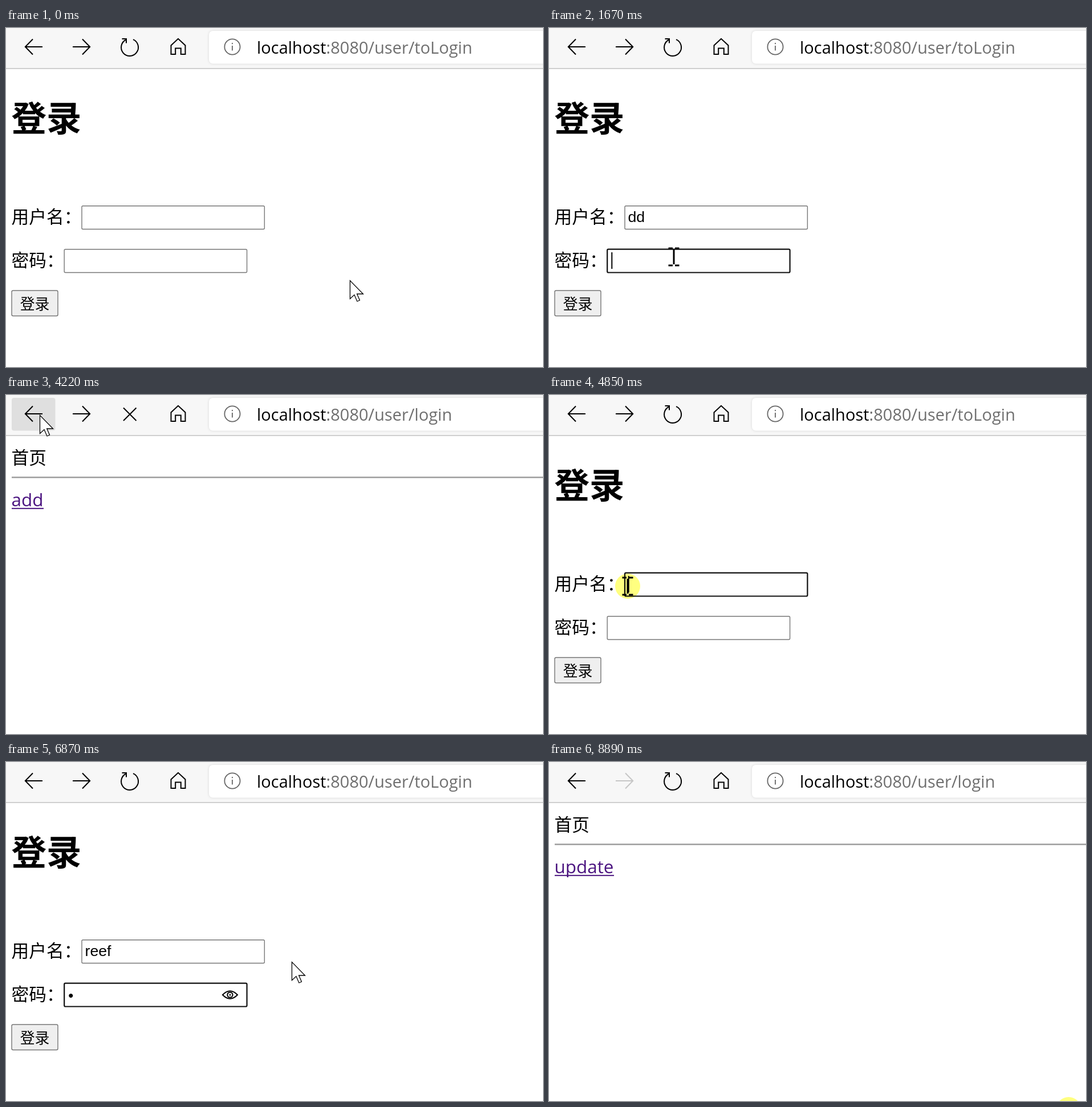
Recreate the animation shown at these times as an HTML page. Size 942 by 594 pixels, loop 8980 ms.

```html
<!DOCTYPE html>
<html lang="zh-CN">
<head>
<meta charset="utf-8">
<title>登录</title>
<style>
html, body { margin: 0; width: 100%; height: 100%; overflow: hidden; background: #fff; }
svg { display: block; width: 942px; height: 594px; }
text { white-space: pre; }
.cjk { font: 30.7px "Noto Sans CJK SC", "Noto Sans CJK", sans-serif; }
.head { font-size: 61.4px; font-weight: 700; }
.small { font-size: 25.8px; }
.ui { font: 29px "Open Sans", "Noto Sans", sans-serif; }
.val { font: 26.7px "Liberation Sans", Arial, sans-serif; }
.dots { font-size: 25.8px; }
.link { font-size: 31.4px; fill: #4b1480; }
.icon { fill: none; stroke: #000; stroke-width: 2; }
.field { fill: #fff; stroke: #767676; stroke-width: 1.4; }
.field.on { stroke: #101010; stroke-width: 2.2; }
.menu { fill: #fff; filter: drop-shadow(0 1px 3px rgba(0, 0, 0, .3)); }
#click { fill: #ffff80; mix-blend-mode: multiply; }
</style>
</head>
<body>
<svg viewBox="0 0 942 594">
  <rect width="942" height="594" fill="#fff"/>

  <g id="login">
    <text class="cjk head" x="9.6" y="181">登录</text>
    <text class="cjk" x="9.6" y="341.5">用户名：</text>
    <text class="cjk" x="9.6" y="417.5">密码：</text>
    <rect id="userBox" class="field" x="133" y="311.7" width="320.4" height="40.8" rx="2"/>
    <rect id="passBox" class="field" x="102.2" y="387.7" width="320.4" height="40.8" rx="2"/>
    <text id="user" class="val" x="138.5" y="340"></text>
    <text id="pass" class="val dots" x="109.3" y="417.5"></text>
    <g id="eye" class="icon">
      <path d="M380 408Q393 394.500 406 408Q393 421.500 380 408Z"/>
      <circle cx="393" cy="408" r="4.600"/>
      <circle cx="393" cy="408" r="1.500" fill="#000" stroke="none"/>
    </g>
    <rect id="button" x="10" y="460" width="81" height="44.500" rx="2.500" fill="#efefef" stroke="#767676" stroke-width="1.400"/>
    <text class="cjk small" x="24.800" y="493">登录</text>
    <rect id="caret" width="2" height="29"/>
    <g id="menu"></g>
  </g>

  <g id="home">
    <text class="cjk" x="9.600" y="121">首页</text>
    <path d="M10 144.300H942" stroke="#8c8c8c" stroke-width="2"/>
    <path d="M10 146H942" stroke="#dedede"/>
    <text id="link" class="ui link" x="9.600" y="195"></text>
    <rect id="line" x="10" y="197.800" height="2" fill="#4b1480"/>
  </g>

  <rect width="942" height="71" fill="#f7f7f7"/>
  <rect y="70" width="942" height="2" fill="#cfcfcf"/>
  <rect x="356" y="5" width="600" height="57.500" rx="7" fill="#fff" style="filter:drop-shadow(0 0 2px rgba(0,0,0,.13))"/>
  <rect id="hover" x="10" y="5" width="76.500" height="57.500" rx="4" fill="#dfdfdf"/>
  <g class="icon">
    <path d="M64 33H34M47 19.500L33.800 33L47 46.500"/>
    <path id="next" d="M117 33H147M134 19.500L147.200 33L134 46.500"/>
    <g id="reload">
      <path d="M223 20.200A15 15 0 1 1 210.500 20.500"/>
      <path d="M203.500 19H211V26.500"/>
    </g>
    <path id="stop" d="M206 22.500L228.500 45M228.500 22.500L206 45"/>
    <path d="M289.500 30.500L302 18.800L314.500 30.500V46H306.800V35.500H297.200V46H289.500Z"/>
  </g>
  <g fill="none" stroke="#666" stroke-width="1.800">
    <circle cx="397" cy="33" r="13.600"/>
    <path d="M397 31V39.500M397 26V28.300"/>
  </g>
  <text class="ui" x="440" y="45">localhost<tspan id="path" fill="#6f6f6f"></tspan></text>

  <circle id="click" r="22"/>
  <path id="arrow" d="M.5 .5V32.500L8 25.500L13 37L17.500 35L12.700 24H23.500Z" fill="#fff" stroke="#000" stroke-width="1.300"/>
  <path id="beam" d="M-9.500-15H-2M2-15H9.500M-9.500 15H-2M2 15H9.500M0-13V13" fill="none" stroke="#000" stroke-width="3"/>
</svg>
<script>
const LOOP = 8980;
const $ = id => document.getElementById(id);

// Each track holds [time, value] steps
const track = {
  user: [[0, ""], [960, "d"], [1190, "dd"], [4300, ""], [5290, "r"], [5440, "re"], [5620, "ree"], [5760, "reef"]],
  dots: [[0, 0], [1820, 1], [1890, 2], [1970, 3], [2140, 4], [2220, 5], [2450, 6], [4300, 0],
    [6240, 1], [7120, 0], [7260, 1], [7410, 2], [7490, 3], [7670, 4]],
  focus: [[0, ""], [570, "user"], [1510, "pass"], [2990, ""], [4780, "user"], [5990, "pass"], [7900, ""]],
  caret: [[0, true], [6870, false], [7260, true]],
  menu: [[0, ""], [650, "dd reef aa cc"], [1040, "dd"], [1190, ""], [5290, "reef"], [5760, ""]],
  page: [[0, "login"], [3210, "add"], [4300, "login"], [7900, "update"]],
  path: [[0, "toLogin"], [3210, "login"], [4300, "toLogin"], [7810, "login"]],
  busy: [[0, false], [3060, true], [3280, false], [4150, true], [4370, false], [7810, true], [7900, false]],
  next: [[0, true], [3210, false], [4150, true], [7810, false]],
  hover: [[0, false], [3960, true], [4300, false]],
  press: [[0, false], [2850, true], [3210, false]]
};

// time, x, y, shape: a = arrow, i = text beam, - = hidden
const moves = [
  [0, 603, 442, "a"], [50, 603, 442, "a"], [140, 500, 345, "a"], [210, 400, 288, "a"], [280, 300, 266, "a"],
  [350, 210, 285, "a"], [420, 143, 319, "i"], [540, 143, 319, "i"], [570, 139, 321, "i"], [960, 139, 321, "-"],
  [1270, 139, 321, "i"], [1490, 219, 401, "i"], [1740, 219, 401, "i"], [1820, 222.5, 401.5, "-"],
  [2220, 222.5, 401.5, "i"], [2480, 222.5, 401.5, "i"], [2600, 185, 428, "a"], [2880, 56, 470, "a"],
  [3200, 56, 470, "a"], [3280, 213, 335, "a"], [3350, 213, 335, "a"], [3370, 210, 334, "a"],
  [3500, 210, 334, "a"], [3750, 130, 150, "a"], [4000, 59, 35, "a"], [4290, 59, 35, "a"],
  [4370, 1, 284, "a"], [4440, 1, 284, "a"], [4600, 80, 312, "i"], [4740, 138, 335, "i"],
  [5290, 138, 335, "-"], [6240, 480, 305, "a"], [6470, 501, 350, "a"], [8330, 501, 350, "a"], [8590, 895, 640, "-"]
];
const clicks = [[570, 139, 321], [1510, 219, 401], [2920, 56, 470], [4060, 59, 35], [4780, 138, 335], [8890, 911.5, 609]];

const last = (list, t) => list.filter(s => s[0] <= t).pop();
const show = (id, on) => $(id).setAttribute("visibility", on ? "inherit" : "hidden");
const place = (id, x, y) => $(id).setAttribute("transform", `translate(${x} ${y})`);
const write = (id, s) => { if ($(id).textContent !== s) $(id).textContent = s; };

let shownMenu = "";
function drawMenu(items) {
  if (items === shownMenu) return;
  shownMenu = items;
  const rows = items ? items.split(" ") : [];
  $("menu").innerHTML = rows.length
    ? `<rect class="menu" x="133" y="356" width="615" height="${27 + rows.length * 61}" rx="7"/>` +
      rows.map((s, i) => `<text class="ui" x="156" y="${410 + i * 61}">${s}</text>`).join("")
    : "";
}

function drawPointer(t) {
  const a = last(moves, t);
  const b = moves[moves.indexOf(a) + 1] || a;
  const k = a[3] === "-" || a === b ? 0 : (t - a[0]) / (b[0] - a[0]);
  // a hidden pointer reappears in place
  const x = a[1] + (b[1] - a[1]) * k, y = a[2] + (b[2] - a[2]) * k;
  for (const [id, shape] of [["arrow", "a"], ["beam", "i"]]) {
    show(id, a[3] === shape);
    place(id, x, y);
  }
  const c = last(clicks, t);
  show("click", c && t - c[0] < 140);
  if (c) place("click", c[1], c[2]);
}

function draw(t) {
  const s = {};
  for (const key in track) s[key] = last(track[key], t)[1];
  const login = s.page === "login";

  show("login", login);
  show("home", !login);
  if (!login) {
    write("link", s.page);
    $("line").setAttribute("width", s.page === "add" ? 56 : 104);
  }
  write("user", s.user);
  write("pass", "•".repeat(s.dots));
  for (const name of ["user", "pass"]) $(name + "Box").classList.toggle("on", s.focus === name);
  show("eye", s.focus === "pass" && s.dots > 0);
  show("caret", s.focus && s.caret);
  const inUser = s.focus === "user";
  place("caret",
    inUser ? 138.7 + $("user").getComputedTextLength() : 109.3 + s.dots * 9,
    inUser ? 317 : 393);
  $("button").setAttribute("fill", s.press ? "#e4e4e4" : "#efefef");
  $("button").setAttribute("stroke", s.press ? "#4c4c4c" : "#767676");
  drawMenu(s.menu);

  write("path", ":8080/user/" + s.path);
  show("stop", s.busy);
  show("reload", !s.busy);
  $("next").setAttribute("stroke", s.next ? "#000" : "#c6c6c6");
  $("next").style.stroke = s.next ? "#000" : "#c6c6c6";
  show("hover", s.hover);
  drawPointer(t);
}

const start = performance.now();
function tick() {
  draw((performance.now() - start) % LOOP);
  requestAnimationFrame(tick);
}
tick();
</script>
</body>
</html>
```
